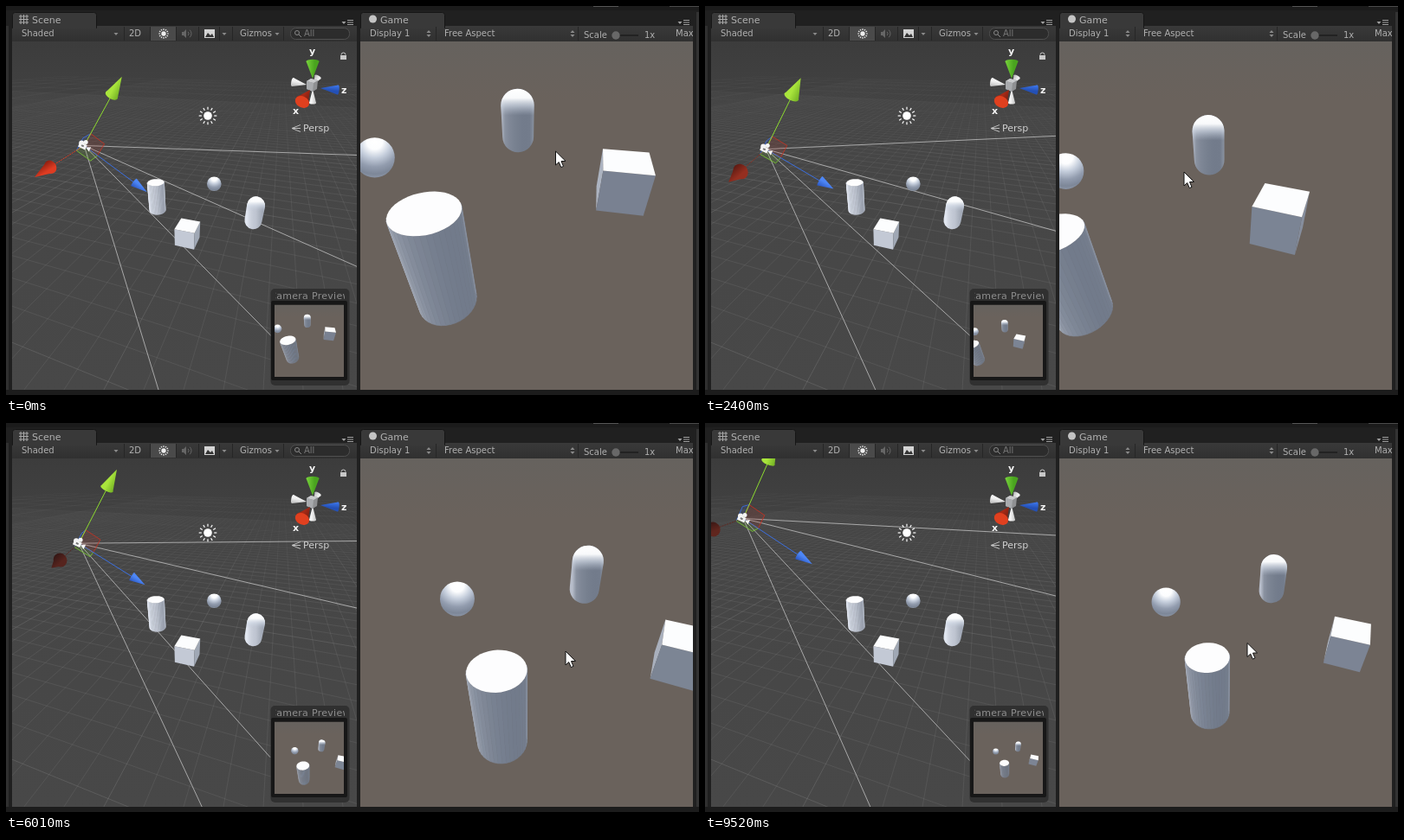
Write an HTML page with a canvas that moves like this. It is 800x450 px and loops after 9.62 s.

```html
<!DOCTYPE html>
<html lang="en">
<head>
<meta charset="utf-8">
<title>Scene and game views</title>
<style>
html, body { margin: 0; width: 100%; height: 100%; overflow: hidden; background: #202020; }
canvas { display: block; width: 800px; height: 450px; }
</style>
</head>
<body>
<canvas id="stage" width="800" height="450"></canvas>
<script>
const LOOP = 9620, STEPS = 72, RAD = Math.PI / 180;

// Game camera stops: x, y, z, yaw, pitch
const stops = [0, 6, 18, 35, 45, 56, 71];
const poses = [
  [1.99, 3.54, -5.97, -10.8, 38.4], [1.99, 3.54, -5.97, -10.8, 41.4], [3.81, 3.97, -5.37, -21.1, 36.4],
  [2.2, 5.1, -6.87, -20.3, 38], [1.92, 4.48, -6.09, -24.1, 37], [1.95, 3.9, -6.13, -15, 37.4],
  [2.26, 5.6, -7.5, -22, 37.9]];
const pointer = [[634.5, 168], [644.5, 168], [553, 192], [624, 271], [646, 264], [649, 250.5], [626, 254.5]];

const stage = document.getElementById('stage').getContext('2d');
const back = document.createElement('canvas');
back.width = 800; back.height = 450;
let g = back.getContext('2d');

function sample(track, s) {
  const last = stops.length - 1;
  let i = 0;
  while (i < last - 1 && s >= stops[i + 1]) i++;
  const span = stops[i + 1] - stops[i], u = (s - stops[i]) / span;
  const slope = (k, c) => k < 1 || k >= last ? 0 :
    .6 * (track[k + 1][c] - track[k - 1][c]) / (stops[k + 1] - stops[k - 1]) * span;
  return track[i].map((a, c) => {
    const b = track[i + 1][c];
    return a + (b - a) * u * u * (3 - 2 * u) + u * (1 - u) * ((1 - u) * slope(i, c) - u * slope(i + 1, c));
  });
}

// Vectors and cameras
const dot = (a, b) => a[0] * b[0] + a[1] * b[1] + a[2] * b[2];
const sub = (a, b) => a.map((v, i) => v - b[i]);
const along = (a, d, k) => a.map((v, i) => v + d[i] * k);
const unit = a => a.map(v => v / Math.hypot(...a));

function camera([x, y, z, yaw, pitch], f, cx, cy, lift) {
  const sy = Math.sin(yaw * RAD), cs = Math.cos(yaw * RAD);
  const sp = Math.sin(pitch * RAD), cp = Math.cos(pitch * RAD);
  const pos = [x, y, z], right = [cs, 0, -sy], up = [sy * sp, cp, cs * sp], ahead = [sy * cp, -sp, cs * cp];
  const local = p => {
    const d = sub(p, pos);
    return [dot(d, right), -dot(d, up), dot(d, ahead)];
  };
  const flat = ([a, b, d]) => [cx + f * a / d, cy + f * b / d, f / d];
  return { pos, right, up, ahead, lift, local, flat, see: p => flat(local(p)) };
}
const sceneCam = camera([12.3, 7.4, 2.95, -108.5, 33], 283, 206, 242.5, .65);
const gameCam = s => camera(sample(poses, s), 349, 601, 242.5, 0);

// Drawing helpers
function fill(c) { g.fillStyle = c; g.fill(); }
function stroke(c, w = 1) { g.strokeStyle = c; g.lineWidth = w; g.stroke(); }
function rect(x, y, w, h, c) { g.fillStyle = c; g.fillRect(x, y, w, h); }
function poly(points, c) {
  g.beginPath();
  points.forEach(p => g.lineTo(p[0], p[1]));
  g.closePath();
  if (c) fill(c);
}
function line(x1, y1, x2, y2, c, w) {
  g.beginPath(); g.moveTo(x1, y1); g.lineTo(x2, y2); stroke(c, w);
}
function disc(x, y, r, c) { g.beginPath(); g.arc(x, y, r, 0, 7); fill(c); }
function round(x, y, w, h, r, c) { g.beginPath(); g.roundRect(x, y, w, h, r); fill(c); }
function text(s, x, y, size = 10, c = '#b0b0b0', weight = '') {
  g.font = `${weight} ${size}px "DejaVu Sans", sans-serif`;
  g.fillStyle = c; g.fillText(s, x, y);
}
function stopsOn(r, stops) { stops.forEach(([at, c]) => r.addColorStop(at, c)); return r; }
const ramp = (x1, y1, x2, y2, ...stops) => stopsOn(g.createLinearGradient(x1, y1, x2, y2), stops);
function clip(x, y, w, h, draw) {
  g.save(); g.beginPath(); g.rect(x, y, w, h); g.clip(); draw(); g.restore();
}
const arrow = (x, y, c = '#8a8a8a') => poly([[x - 2.5, y - 1], [x + 2.5, y - 1], [x, y + 2]], c);
const blend = (a, b, k) => `rgb(${a.map((v, i) => Math.round(v + (b[i] - v) * Math.max(0, Math.min(1, k))))})`;

// Wall tone from how far it turns sideways and how squarely it faces the eye
function tone(side, facing, lift) {
  const k = lift * (1 - .5 * Math.max(0, side)) + .4 * Math.max(0, (.4 - side) / 1.4) ** 1.4 * (1 - facing * .5)
    + .22 * (1 - facing) ** 3;
  return blend([114, 123, 139], [225, 230, 240], k);
}

function drawBall(cam, at) {
  const [x, y, k] = cam.see(at), r = k * .5;
  disc(x, y, r, stopsOn(g.createRadialGradient(x, y - r * .8, 0, x, y - r * .8, r * 1.8),
    [[0, '#fff'], [.22, '#fcfdfe'], [.45, '#c5cedc'], [.7, '#929cae'], [.9, '#7d8798'], [1, '#8a94a5']]));
}
function drawPill(cam, [x, y, z]) {
  const [x1, y1, k1] = cam.see([x, y + .5, z]), [x2, y2, k2] = cam.see([x, y - .5, z]);
  const r = k1 / 2, a = Math.atan2(y2 - y1, x2 - x1), h = Math.PI / 2;
  const body = ramp(x1 - r, 0, x1 + r, 0);
  for (let u = -1; u <= 1; u += .25) body.addColorStop((u + 1) / 2, tone(u, Math.sqrt(1 - u * u), cam.lift));
  g.beginPath();
  g.arc(x1, y1, r, a + h, a - h);
  g.arc(x2, y2, k2 / 2, a - h, a + h);
  g.closePath();
  fill(body);
  fill(ramp(0, y1 - r, 0, y1 + r * .6, [0, '#fff'], [.35, 'rgba(252,253,254,.97)'], [.65, 'rgba(215,223,235,.6)'],
    [1, 'rgba(190,200,216,0)']));
}
function drawCan(cam, [x, y, z]) {
  const n = 40, rim = (i, dy) => {
    const a = i / n * 2 * Math.PI;
    return cam.see([x + Math.cos(a) / 2, y + dy, z + Math.sin(a) / 2]);
  };
  const eye = unit([cam.pos[0] - x, 0, cam.pos[2] - z]), cross = [-eye[2], 0, eye[0]];
  for (let i = 0; i < n; i++) {
    const a = (i + .5) / n * 2 * Math.PI, normal = [Math.cos(a), 0, Math.sin(a)];
    const facing = dot(normal, eye);
    if (facing < -.1) continue;
    const c = tone(dot(normal, cross), Math.max(0, facing), cam.lift);
    poly([rim(i, 1), rim(i + 1, 1), rim(i + 1, -1), rim(i, -1)], c);
    stroke(c, .6);
  }
  poly(Array.from({ length: n }, (_, i) => rim(i, 1)), '#fdfdfe');
}
function drawBox(cam, at) {
  for (const axis of [0, 2, 1]) for (const sign of [-1, 1]) {
    const normal = [0, 0, 0];
    normal[axis] = sign;
    const mid = along(at, normal, .5), eye = unit(sub(cam.pos, mid)), facing = dot(normal, eye);
    if (facing <= 0) continue;
    const p = (axis + 1) % 3, q = (axis + 2) % 3;
    const face = [[-1, -1], [1, -1], [1, 1], [-1, 1]].map(([a, b]) => {
      const v = [...mid];
      v[p] += a / 2; v[q] += b / 2;
      return cam.see(v);
    });
    poly(face, axis === 1 ? '#fcfdfe' : tone(dot(normal, cam.right), Math.min(1, facing * 1.5), cam.lift));
  }
}
function solids(cam) {
  drawPill(cam, [0, 0, 3]);
  drawBall(cam, [-3, 0, 0]);
  if (cam !== sceneCam) drawBox(cam, [3, 0, 0]);
  drawCan(cam, [0, 0, -3]);
  if (cam === sceneCam) drawBox(cam, [3, 0, 0]);
}
function gameWorld(cam) {
  rect(409, 41, 384, 403, ramp(0, 41, 0, 110, [0, '#66625e'], [1, '#6a625c']));
  solids(cam);
}

// World line in the scene view, cut at the near plane
function segment(a, b, c) {
  let p = sceneCam.local(a), q = sceneCam.local(b);
  const near = .4;
  if (p[2] < near && q[2] < near) return;
  if (p[2] < q[2]) [p, q] = [q, p];
  if (q[2] < near) q = along(p, sub(q, p), (p[2] - near) / (p[2] - q[2]));
  const [x1, y1] = sceneCam.flat(p), [x2, y2] = sceneCam.flat(q);
  line(x1, y1, x2, y2, typeof c === 'string' ? c : `rgba(190,190,190,${c * Math.min(1, 18 / p[2])})`);
}
function grid() {
  for (let i = -90; i <= 90; i++) {
    const major = i % 10 === 0;
    if (!major && Math.abs(i) > 40) continue;
    for (let j = -90; j < 90; j += 6) {
      segment([i, 0, j], [i, 0, j + 6], major ? .16 : .1);
      segment([j, 0, i], [j + 6, 0, i], major ? .16 : .1);
    }
  }
}

function sun(x, y, r, c) {
  disc(x, y, r, c);
  for (let a = 0; a < 6.2; a += Math.PI / 6) {
    const u = Math.cos(a), v = Math.sin(a);
    line(x + u * r * 1.5, y + v * r * 1.5, x + u * r * 2.15, y + v * r * 2.15, c, 1.2);
  }
}
function menu(x) {
  arrow(x - 3, 19, '#a0a0a0');
  for (let i = 0; i < 3; i++) rect(x + 1, 16 + i * 2.5, 7, 1, '#a0a0a0');
}
function panel(x, w, title) {
  rect(x, 23, w, 18, ramp(0, 23, 0, 41, [0, '#393939'], [1, '#303030']));
  round(x + .5, 7.5, 97, 18, [3, 3, 0, 0], '#393939');
  stroke('#161616');
  rect(x + 1, 23, 96, 3, '#393939');
  text(title, x + 23, 19.5, 11);
  menu(x + w - 12);
}
function frame() {
  rect(0, 0, 800, 450, '#202020');
  rect(0, 0, 800, 5, '#1b1b1b');
  rect(678, 0, 29, 1, '#555'); rect(766, 0, 34, 1, '#4a4a4a');
  rect(0, 23, 3, 421, '#303030'); rect(797, 7, 3, 437, '#333');
  rect(0, 444, 800, 6, '#1c1c1c');
  panel(7, 398, 'Scene'); panel(409, 384, 'Game');
  for (const v of [0, 3.5, 7]) {
    line(17 + v, 10, 17 + v, 21, '#a8a8a8'); line(15, 12 + v, 26, 12 + v, '#a8a8a8');
  }
  disc(423.5, 15, 4.5, '#c4c4c4');

  rect(167, 24, 29, 16, '#4a4a4a');
  sun(182, 32, 2.7, '#eee');
  poly([[203, 30], [205, 30], [208, 27], [208, 37], [205, 34], [203, 34]], '#666');
  for (const r of [3, 6]) {
    g.beginPath(); g.arc(208, 32, r, -.8, .8); stroke('#666');
  }
  rect(229, 27, 12, 10, '#d4d4d4');
  poly([[230, 36], [233, 31], [236, 34], [238, 32], [240, 36]], '#333');
  for (const x of [127, 252, 313]) arrow(x, 32);
  for (const x of [136, 166, 196, 222, 246, 261, 320, 496, 660]) rect(x, 24, 1, 16, '#262626');
  round(328.5, 25.5, 68, 13, 6, '#2c2c2c'); stroke('#505050');
  g.beginPath(); g.arc(336, 31, 2.5, 0, 7); stroke('#888');
  line(338, 33, 341, 36, '#888');
  for (const x of [488, 654]) {
    arrow(x, 34); poly([[x - 2.5, 31], [x + 2.5, 31], [x, 28]], '#8a8a8a');
  }
  rect(704, 33, 26, 2, '#222'); disc(704, 34, 4.7, '#686868');
  text('Shaded', 18, 35); text('2D', 142, 35); text('Gizmos', 270, 35);
  text('All', 344, 35, 10, '#787878');
  text('Display 1', 420, 35); text('Free Aspect', 506, 35);
  text('Scale', 667, 37); text('1x', 737, 37);
  clip(409, 23, 384, 18, () => text('Max', 773, 35));
}

// Cone from base centre to tip; squash flattens the base ellipse
function cone(bx, by, tx, ty, w, squash, light, dark) {
  g.save(); g.translate(bx, by); g.rotate(Math.atan2(ty - by, tx - bx));
  const c = ramp(0, -w, 0, w, [0, light], [.35, light], [1, dark]);
  poly([[0, -w], [Math.hypot(tx - bx, ty - by), 0], [0, w]], c);
  g.beginPath(); g.ellipse(0, 0, w * squash, w, 0, 0, 7); fill(c);
  g.restore();
}
function compass() {
  cone(360, 82, 355, 91, 4, .4, '#ededed', '#b5b5b5');
  cone(331, 88, 347, 91, 5, .35, '#f2f2f2', '#b8b8b8');
  cone(354, 112, 354, 96, 4, .4, '#f4f4f4', '#c4c4c4');
  poly([[347, 87], [352, 84], [360, 86], [359, 96], [354, 99], [347, 96]], '#8f9092');
  poly([[347, 87], [352, 84], [360, 86], [355, 89]], '#c9cacc');
  poly([[347, 87], [355, 89], [354, 99], [347, 96]], '#a8aaad');
  cone(354, 64, 354, 84, 7.5, .3, '#4aa41f', '#79d43c');
  cone(383, 97, 363, 95, 5.5, .3, '#2450b5', '#3f7af0');
  cone(342, 110, 351, 97, 8, .7, '#a62a16', '#6d1c11');
  g.beginPath(); g.ellipse(342, 111, 8.5, 6.5, .45, 0, 7); fill('#e0401f');
  const label = (s, x, y) => text(s, x, y, 11, '#f4f4f4', 'bold');
  label('y', 350, 56); label('z', 387, 101); label('x', 331, 125);
  rect(386, 57, 7, 5, '#c8c8c8');
  g.beginPath(); g.arc(389.5, 56.5, 2.5, Math.PI, 0); stroke('#c8c8c8');
  for (const y of [137.5, 141.5, 145.5]) line(340, y, 330, 141.5, '#bdbdbd');
  text('Persp', 343, 145, 11, '#d0d0d0');
}

function frustum(cam) {
  const t = Math.tan(30 * RAD), aspect = 384 / 403;
  for (const a of [-1, 1]) for (const b of [-1, 1]) {
    const dir = along(along(cam.ahead, cam.right, a * t * aspect), cam.up, b * t);
    segment(cam.pos, along(cam.pos, dir, 500), 'rgba(205,205,205,.72)');
  }
}
function moveTool(cam) {
  const o = cam.pos, size = .315 * sceneCam.local(o)[2], view = unit(sub(o, sceneCam.pos));
  const [x, y] = sceneCam.see(o), at = (d, k) => sceneCam.see(along(o, d, k * size));
  const patch = (p, q, c) => {
    const far = sceneCam.see(along(along(o, p, .2 * size), q, .2 * size));
    poly([[x, y], at(p, .2), far, at(q, .2)], `rgba(${c},.14)`);
    stroke(`rgba(${c},.85)`);
  };
  patch(cam.right, cam.up, '60,110,230');
  patch(cam.right, cam.ahead, '120,200,50');
  patch(cam.up, cam.ahead, '200,50,35');
  const handle = (d, from, w, light, dark, shaft) => {
    const b = at(d, from), t = at(d, 1);
    line(x, y, b[0], b[1], shaft);
    cone(b[0], b[1], t[0], t[1], w * b[2] / 22, Math.abs(dot(d, view)), light, dark);
  };
  const lit = (.91 - Math.abs(dot(cam.right, view))) / .06;
  const red = blend([86, 36, 30], [222, 60, 34], lit), deep = blend([52, 22, 20], [140, 30, 16], lit);
  g.setLineDash([2, 1]);
  handle(cam.right, .74, 6.3, red, deep, red);
  g.setLineDash([]);
  handle(cam.ahead, .78, 5.6, '#4d86f5', '#2a55c0', '#3b6fe0');
  handle(cam.up, .76, 6.8, '#a9e53c', '#73b024', '#8ddb2f');
  // camera icon
  disc(x - 3, y - 3, 3, '#f4f4f4'); disc(x + 2, y - 4, 2.5, '#f4f4f4');
  g.save(); g.translate(x, y); g.rotate(.45);
  rect(-6, -2, 9, 6, '#f4f4f4'); poly([[3, 1], [8, -2], [8, 4]], '#f4f4f4');
  rect(-3, 0, 3, 2, '#777');
  g.restore();
}
function preview(cam) {
  round(305.5, 327, 91, 112, 5, 'rgba(46,46,46,.92)');
  clip(311, 327, 80, 14, () => {
    g.textAlign = 'center'; g.letterSpacing = '.3px';
    text('Camera Preview', 351, 338.5, 11, '#8e8e8e');
  });
  round(306, 341, 88, 92, 2, '#171717');
  clip(310, 345.5, 80, 83.5, () => {
    g.translate(310, 345.5); g.scale(80 / 384, 83.5 / 403); g.translate(-409, -41);
    gameWorld(cam);
  });
}
function drawPointer([x, y]) {
  poly([[0, 0], [0, 16], [3.7, 12.6], [6.3, 18.6], [9, 17.4], [6.5, 11.6], [11.5, 11.4]]
    .map(([a, b]) => [x + a, y + b]), '#fff');
  stroke('#111');
}

function backdrop() {
  frame();
  clip(7, 41, 398, 403, () => {
    rect(7, 41, 398, 403, ramp(0, 41, 0, 444, [0, '#3c3c3c'], [.08, '#3f3f3f'], [.3, '#464646'], [1, '#484848']));
    grid();
  });
}
function draw(s) {
  const cam = gameCam(s);
  g.drawImage(back, 0, 0);
  clip(7, 41, 398, 403, () => {
    frustum(cam);
    solids(sceneCam);
    sun(233, 127, 4.8, '#fff');
    moveTool(cam);
    compass();
    preview(cam);
  });
  clip(409, 41, 384, 403, () => {
    gameWorld(cam);
    drawPointer(sample(pointer, s));
  });
}

backdrop();
g = stage;
const start = performance.now();
function tick() {
  const t = (performance.now() - start) % LOOP;
  draw(Math.min(STEPS - 1, Math.floor(t / LOOP * STEPS + .15)));
  requestAnimationFrame(tick);
}
tick();
</script>
</body>
</html>
```
